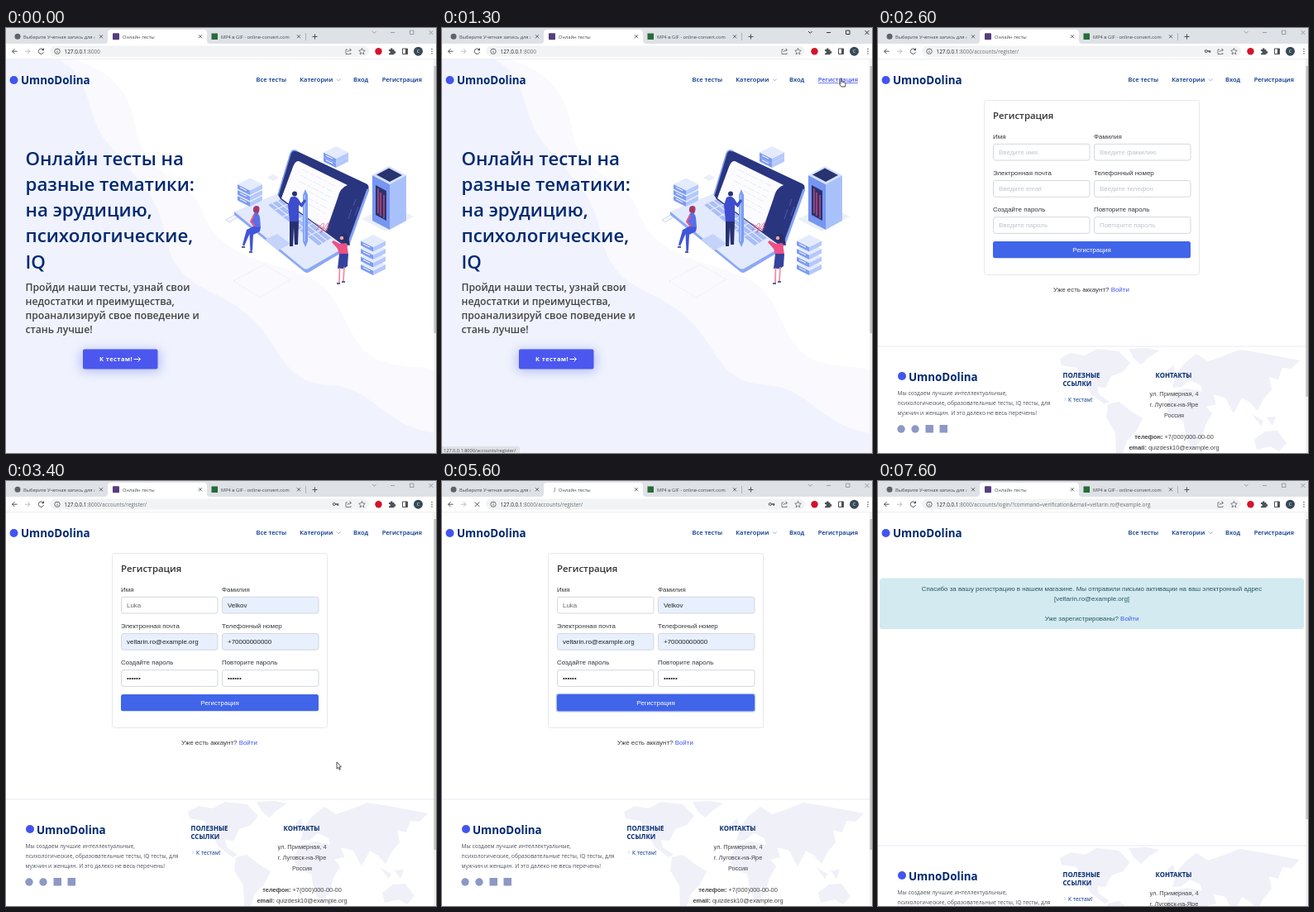
Animation of 520 by 514 pixels, one loop 8 s. Source, as an HTML page:

```html
<!DOCTYPE html>
<html lang="ru">
<head>
<meta charset="utf-8">
<style>
html, body { margin: 0; height: 100%; overflow: hidden; background: #fff; }
svg { display: block; width: 100vw; height: 100vh; }
text { white-space: pre; }
.ui { font-family: "Open Sans", sans-serif; font-size: 5.7px; fill: #45494e; }
.url { font-size: 6.4px; fill: #6a6e73; }
.url .host { fill: #222; }
.head { font-family: "Open Sans", sans-serif; font-weight: 600; fill: #012970; }
.bold { font-weight: 700; }
.nav { font-size: 7.5px; }
.brand { font-size: 13.4px; }
.small { font-family: "Open Sans", sans-serif; font-size: 6.75px; fill: #50545c; }
.body { font-family: "Liberation Sans", Arial, sans-serif; font-size: 7.95px; fill: #33373c; }
.contact { font-family: "Liberation Sans", Arial, sans-serif; font-size: 7.4px; fill: #444; }
.mid { text-anchor: middle; }
.line { fill: none; stroke: #4d5156; stroke-width: 1; }
.link { fill: #4154f1; }
</style>
</head>
<body>
<svg viewBox="0 0 520 514" preserveAspectRatio="none">
<defs>
  <clipPath id="tabClip1"><path d="M20 3h88v14H20z"/></clipPath>
  <clipPath id="tabClip2"><path d="M128 3h100v14H128z"/></clipPath>
  <filter id="glow" x="-30%" y="-100%" width="160%" height="300%"><feGaussianBlur stdDeviation="7"/></filter>
  <linearGradient id="fade"><stop offset=".75" stop-color="#dee1e6" stop-opacity="0"/><stop offset="1" stop-color="#dee1e6"/></linearGradient>

  <g id="slab">
    <path d="M-15 0 0 7.500V13L-15 5.500z" fill="#7d9bf2"/><path d="M15 0 0 7.500V13L15 5.500z" fill="#b4c8fb"/>
    <path d="M0-7.500 15 0 0 7.500-15 0z" fill="#e4ebfd"/><path d="M-12 3.700-4 7.700" stroke="#fff" stroke-width="1"/>
  </g>

  <g id="footer">
    <path d="M0 385H517" stroke="#e9eaf4"/>
    <g fill="#eff0f8">
      <path d="M220 400 233 393 250 396 265 388 291 391 305 405 296 416 282 421 275 435 265 434 267 443 280 452 274 455 258 443 246 424 240 411 222 408z"/>
      <path d="M303 388 325 387 340 390 328 398 318 407 309 399z"/>
      <path d="M278 455 291 452 308 465 320 472 312 488 301 499 296 514 288 514 287 489 276 471z"/>
      <path d="M361 418 371 405 385 394 399 403 417 397 437 389 462 393 489 398 510 402 500 412 489 411 484 425 473 422 476 437 466 449 459 463 450 453 440 447 430 466 420 447 405 443 409 455 397 458 404 466 396 480 391 498 379 510 372 491 369 475 353 470 347 457 357 440 374 436 392 440 390 432 377 426 367 434 356 435z"/>
      <path d="M350 414 357 408 360 419 352 424zM452 467 466 475 463 481zM470 471 481 470 477 481zM455 498 468 488 483 487 494 502 485 512 475 506 458 510z"/>
    </g>
    <circle cx="29" cy="421" r="5" fill="#4154f1"/>
    <text class="head bold brand" x="37" y="426.500">UmnoDolina</text>
    <g class="small">
      <text x="23.5" y="443.5">Мы создаем лучшие интеллектуальные,</text>
      <text x="23.5" y="455.7">психологические, образовательные тесты, IQ тесты, для</text>
      <text x="23.5" y="467.7">мужчин и женщин. И это далеко не весь перечень!</text>
      <text x="230" y="451.5" fill="#013289">К тестам!</text>
    </g>
    <path d="M225 447l2 2-2 2" class="line" style="stroke:#d0d4fc"/>
    <g fill="#8c98c5"><circle cx="28" cy="485" r="4.7"/><circle cx="45" cy="485" r="4.7"/><rect x="57.5" y="480" width="9.5" height="9.5"/><rect x="74.5" y="480" width="9.5" height="9.5"/></g>
    <g class="head bold" font-size="7.9">
      <text x="223.5" y="422.5">ПОЛЕЗНЫЕ</text><text x="223.5" y="432.7">ССЫЛКИ</text><text x="335.5" y="422.5">КОНТАКТЫ</text>
    </g>
    <g class="contact mid">
      <text x="358" y="444.7">ул. Примерная, 4</text>
      <text x="358" y="457.7">г. Луговск-на-Яре</text>
      <text x="358" y="470.7">Россия</text>
      <text x="358" y="496.7"><tspan class="bold">телефон:</tspan> +7(000)000-00-00</text>
      <text x="358" y="509.7"><tspan class="bold">email:</tspan> quizdesk10@example.org</text>
    </g>
  </g>
</defs>

<rect width="520" height="514" fill="#fff"/>

<g id="home">
  <path d="M0 38H82C138 56 150 85 157 122C167 184 219 174 237 221C258 281 325 282 367 302C417 326 407 388 455 403C485 413 508 407 520 416V514H0z" fill="#f9f9fe"/>
  <path d="M0 38H64C106 62 94 101 122 138C151 177 183 196 193 252C207 323 258 310 300 354C337 392 335 429 393 432C446 435 456 482 520 490V514H0z" fill="#f0f3fd"/>
  <g class="head" font-size="22.3" id="title"></g>
  <g class="head" font-size="12.2" style="fill:#444" id="subtitle"></g>
  <rect x="91" y="390" width="95" height="25" rx="3" fill="#4154f1" opacity=".36" filter="url(#glow)"/>
  <rect x="93" y="388.5" width="90.5" height="24" rx="2" fill="#4b57ee"/>
  <text class="head bold" x="113" y="403" font-size="7.5" letter-spacing=".4" style="fill:#fff">К тестам!</text>
  <path d="M154.500 400.500h8m-2.800-2.800 2.800 2.800-2.800 2.800" class="line" style="stroke:#fff"/>

  <g id="illustration">
    <path d="M275 306 312 286 344 304 307 326z" fill="none" stroke="#e3e6f0" stroke-width=".7" stroke-dasharray="2 1.500"/>
    <path d="M316 181l7-4 7 4-7 4zM430 231l35-17 28 14-34 18z" fill="#eceef8"/>
    <path d="M266 232 283 222 286 225 270 235z" fill="#f5f7ff" stroke="#b9c4e8" stroke-width=".7"/>
    <path d="M276 222V226L361 295Q364 297 367 295L412 268V264z" fill="#8ca8f5"/>
    <path d="M276 222 329 200 412 264 367 290Q363 293 359 290z" fill="#e3eafd"/>
    <path d="M317 214 333 207 393 254 378 263z" fill="#a9bdf7"/>
    <path d="M322 212 383 260M328 209 388 257M325 220 341 213M335 228 351 221M345 236 361 228M355 244 371 236M365 252 381 244" stroke="#e8eefe" stroke-width="1.100"/>
    <path d="M313 256 328 249 344 261 329 269z" fill="#c5d3fa"/>
    <path d="M329 202 344 152Q346 146 352 149L435 188Q440 190 438 196L415 259Q412 266 407 262L332 207z" fill="#2a3580"/>
    <path d="M329 202 344 152Q346 146 352 149" fill="none" stroke="#7f9cf2" stroke-width="1.600"/>
    <path d="M438 195 415 259Q412 266 407 262" fill="none" stroke="#86a4f5" stroke-width="3"/>
    <path d="M354 161 413 190Q404 193 401 206L387 246 333 206 347 168Q350 160 354 161z" fill="#fcfcff"/>
    <path d="M358 171 398 191M356 178 395 198M354 185 393 205M365 197 391 211M364 205 388 218M366 213 386 224" stroke="#e1e5f2" stroke-width=".8" stroke-dasharray="9 2 5 2"/>
    <path d="M423 207l-3 8m-2 4-4 12m12-15-4 11" stroke="#5263b0" stroke-width=".8"/>
    <path d="M375 245c7-10 12-12 8-3s-3 7 3-2 4-3 1 3 1 1 4-3M374 236l15 9" fill="none" stroke="#e64a72" stroke-width=".7"/>

    <use href="#slab" x="295" y="203"/><use href="#slab" x="295" y="196"/><use href="#slab" x="295" y="189"/>
    <use href="#slab" x="399" y="156"/><use href="#slab" x="399" y="150.500"/>
    <g id="stack"></g>

    <path d="M443 178 464 189V244L443 233z" fill="#7796f1"/><path d="M484 178 464 189V244L484 233z" fill="#a9c1fb"/>
    <path d="M443 178 463 167 484 178 464 189z" fill="#d4e1fe"/><path d="M448 177.500 463 169.500 479 178 464 186z" fill="#29336f"/>
    <path d="M447 190 460 197V233L447 226z" fill="#29336f"/><path d="M450 194V224M453 199V227M457 202V230" stroke="#e64b77" stroke-width="1.200"/>

    <path d="M359 202 362 195 365 202V258L362 265 359 258z" fill="#7b9df3"/><path d="M361 202V258" stroke="#c7d8fe"/>
    <circle cx="349" cy="200.500" r="3" fill="#2a3376"/>
    <path d="M344 205Q349 202 353 206L357 212 361 207 363 209 358 217 354 214V234H343L341 214z" fill="#3d4dcc"/>
    <path d="M343 234H354L353 262H349L348 241 347 264H343z" fill="#27306f"/>

    <path d="M299 222Q298 215 303 215T306 222L304 226z" fill="#a33a68"/>
    <path d="M300 224Q305 222 307 229L308 241 300 242 296 234z" fill="#5a6fe4"/>
    <path d="M300 226 296 234 301 240" fill="none" stroke="#ed5780" stroke-width="2"/>
    <path d="M299 240 308 241 307 246 299 250 298 269 295.500 271 294.500 249 288 264 286 262 291 244z" fill="#4056d9"/>
    <path d="M294 271h4M285 265h4" stroke="#27306f" stroke-width="1.500"/>

    <path d="M404 251Q410 245 414 252L416 263 408 261z" fill="#27306f"/><circle cx="406" cy="254" r="2.200" fill="#f2a49d"/>
    <path d="M404 261 412 260 414 274H403L401 267 394 259 396 257z" fill="#ed5185"/>
    <path d="M403 273H414L413 288 409 291H401z" fill="#34429f"/><path d="M403.500 290 403 308M409 289 408 306" stroke="#f08aa0" stroke-width="1.700"/>
    <path d="M400 309h4M406 307h4" stroke="#27306f" stroke-width="1.400"/>
  </g>
</g>

<g id="register">
  <rect x="128.500" y="87.500" width="260" height="211" rx="3" fill="#fff" stroke="#e6e8ee"/>
  <text class="head" x="139" y="109.700" font-size="11.4" style="fill:#333">Регистрация</text>
  <g id="fields"></g>
  <rect id="ring" x="137.800" y="256.800" width="241.400" height="22.600" rx="3.500" fill="#b3c0f3"/>
  <rect id="submit" x="139" y="258" width="239" height="20.300" rx="2.500"/>
  <text class="body mid" x="258.500" y="271" style="fill:#fff">Регистрация</text>
  <text class="body mid" x="258" y="319">Уже есть аккаунт? <tspan class="link">Войти</tspan></text>
  <use href="#footer"/>
</g>

<g id="done">
  <rect x="2" y="117.500" width="513" height="61.500" rx="3.500" fill="#d2eaf0"/>
  <g class="body mid" style="fill:#28575f">
    <text x="258.500" y="132.500">Спасибо за вашу регистрацию в нашем магазине. Мы отправили письмо активации на ваш электронный адрес</text>
    <text x="258.500" y="144.700">[veltarin.ro@example.org]</text>
    <text x="258.500" y="168.500">Уже зарегистрированы? <tspan class="link">Войти</tspan></text>
  </g>
  <use href="#footer" y="56"/>
</g>

<circle cx="9.500" cy="63" r="5" fill="#4154f1"/>
<text class="head bold brand" x="18" y="68">UmnoDolina</text>
<g class="head nav" style="fill:#013289">
  <text x="302.500" y="65.100">Все тесты</text><text x="355.300" y="65.100">Категории</text>
  <text x="420" y="65.100">Вход</text><text id="navRegister" x="454.700" y="65.100">Регистрация</text>
</g>
<path d="M400 61.500l2.300 2.300 2.300-2.300" class="line" style="stroke:#7886b5;stroke-width:.7"/>

<rect x="517" y="38" width="3" height="476" fill="#f1f1f1"/>
<rect id="thumb" x="517.500" y="46" width="2.500" fill="#c1c1c1"/>

<g id="chrome">
  <rect width="520" height="20" fill="#dee1e6"/>
  <path d="M119 19Q123 19 123 15V6Q123 2 127 2H239Q243 2 243 6V15Q243 19 247 19V38H520V19H0V38H119z" fill="#fff"/>
  <path d="M0 19H520V38H0z" fill="#fff"/><path d="M0 37.700H520" stroke="#e2e4e7" stroke-width=".7"/>
  <rect x="53" y="21.500" width="386" height="13" rx="6.500" fill="#f1f3f4"/>
  <circle cx="14" cy="10.300" r="3.500" fill="#5f6368"/>
  <text class="ui" x="21" y="12.500" clip-path="url(#tabClip1)">Выберите Учетная запись для использования</text>
  <rect x="88" y="5" width="21" height="11" fill="url(#fade)"/>
  <rect id="favicon" x="129" y="6.300" width="8" height="8" rx="1" fill="#563d7c"/>
  <path id="spinner" d="M0-3.700A3.700 3.700 0 0 1 3.700 0" class="line" style="stroke:#8a8f96"/>
  <text class="ui" id="tabTitle" x="141" y="12.500" clip-path="url(#tabClip2)"></text>
  <rect x="248.500" y="6.500" width="7.500" height="7.500" fill="#276b38"/>
  <text class="ui" x="260" y="12.500">MP4 в GIF - online-convert.com</text>
  <g id="tabClose" class="line" style="stroke-width:.9"></g>
  <path d="M362.500 6v9" stroke="#9aa0a6" stroke-width=".7"/><path d="M370.500 10.500h6m-3-3v6" class="line"/>
  <g id="controls" fill="none" stroke-width=".9">
    <path d="M443 4l2.300 2.300L447.600 4M465 5.500h5M488.500 3h4.500v4.500h-4.500zM511.500 3l5 5m0-5-5 5"/>
  </g>
  <path d="M13.500 28.200H7.500m3-3-3 3 3 3" class="line"/>
  <path d="M23 28.200h6m-3-3 3 3-3 3" class="line" style="stroke:#babdc1"/>
  <g id="reload"><path d="M45 26.200A3.200 3.200 0 1 0 45.500 29.200" class="line"/><path d="M46 24v3.200h-3.200z" fill="#4d5156"/></g>
  <path id="stop" d="M39.800 25.500l5.500 5.500m0-5.500-5.500 5.500" class="line"/>
  <circle cx="62" cy="28.200" r="3.200" class="line" style="stroke-width:.8"/><path d="M62 27.800v2.200M62 26v.8" class="line" style="stroke-width:.8"/>
  <text class="ui url" x="70.500" y="30.600"><tspan class="host">127.0.0.1</tspan><tspan id="path"></tspan></text>
  <g id="key"><circle cx="396.800" cy="28" r="1.500" class="line"/><path d="M398.300 28h4m-1 0v2" class="line" style="stroke-width:1.300"/></g>
  <path d="M413 26h-2v5.500h6V30M413 29q.5-2.500 4-2.500m-1.500-2 2 2-2 2" class="line" style="stroke-width:.7"/>
  <path d="M430.500 24.400l1.100 2.500 2.700.3-2 1.900.6 2.700-2.400-1.400-2.400 1.400.6-2.700-2-1.900 2.700-.3z" class="line" style="stroke-width:.7"/>
  <circle cx="450.500" cy="28.200" r="4.200" fill="#d4142c"/>
  <path d="M463 26h2a1.300 1.300 0 1 1 2.500 0h2v2.200a1.300 1.300 0 1 1 0 2.400v1.600h-6.500v-2a1.200 1.200 0 1 0 0-2z" fill="#4d5156"/>
  <path d="M479.500 25h6v6.500h-6z" class="line"/><path d="M483 25h3v6.500h-3z" fill="#4d5156"/>
  <circle cx="498.500" cy="28.200" r="5.500" fill="#364957"/><text class="ui mid" x="498.500" y="30.300" style="fill:#fff">С</text>
  <path d="M515 25.500v0m0 2.700v0m0 2.700v0" stroke="#4d5156" stroke-width="1.500" stroke-linecap="round"/>
</g>

<g id="status">
  <path d="M0 506H92Q94 506 94 508V514H0z" fill="#dee1e6"/>
  <text class="ui" x="2" y="512.800" style="font-size:5.6px">127.0.0.1:8000/accounts/register/</text>
</g>
<g id="cursor" fill="#fff" stroke="#222" stroke-width=".8">
  <path id="arrow" d="M0 0V8L1.800 6.300 3.100 9.300 4.400 8.700 3.100 5.800H5.400z"/>
  <path id="hand" d="M0 0q1-1 1.500 0V4l3.800 1q1 .4.800 1.500L5.500 10H1L-1.800 6.500q0-1 1.300-.5L0 6.500z"/>
</g>
</svg>
<script>
const $ = id => document.getElementById(id);
const show = (id, on) => $(id).style.display = on ? '' : 'none';
const lines = (id, x, y, step, rows) =>
  $(id).innerHTML = rows.map((row, i) => `<text x="${x}" y="${y + i * step}">${row}</text>`).join('');

lines('title', 23.5, 165.7, 31.2, ['Онлайн тесты на', 'разные тематики:', 'на эрудицию,', 'психологические,', 'IQ']);
lines('subtitle', 23.5, 318, 17, ['Пройди наши тесты, узнай свои', 'недостатки и преимущества,', 'проанализируй свое поведение и', 'стань лучше!']);
$('stack').innerHTML = [286, 276.5, 267, 257.5].map(y => `<use href="#slab" x="444" y="${y}"/>`).join('');
$('tabClose').innerHTML = [115, 235, 354].map(x => `<path d="M${x - 2} 8.300l4 4m0-4-4 4"/>`).join('');

// label, placeholder, value, autofilled
const fields = [
  ['Имя', 'Введите имя', 'Luka', false],
  ['Фамилия', 'Введите фамилию', 'Velkov', true],
  ['Электронная почта', 'Введите email', 'veltarin.ro@example.org', true],
  ['Телефонный номер', 'Введите телефон', '+70000000000', true],
  ['Создайте пароль', 'Введите пароль', '••••••', false],
  ['Повторите пароль', 'Повторите пароль', '••••••', false]
];
function drawFields(filled) {
  $('fields').innerHTML = fields.map(([label, hint, value, auto], i) => {
    const x = 139 + i % 2 * 122, y = 140 + (i >> 1) * 44.2;
    const ink = !filled ? '#bfc4cd' : i ? '#222' : '#666';
    return `<text class="body" x="${x}" y="${y - 6}">${label}</text>
      <rect x="${x + .5}" y="${y + .3}" width="116.500" height="19.700" rx="2.500" stroke="#d3d7de" fill="${filled && auto ? '#e8f0fe' : '#fff'}"/>
      <text class="body" x="${x + 7}" y="${y + 12.8}" style="fill:${ink}">${filled ? value : hint}</text>`;
  }).join('');
}

// time, x, y; each path is one visit of the pointer
const visits = [
  [[700, 400, 370], [800, 425, 270], [900, 465, 120], [1000, 482, 61], [1800, 482, 61], [1900, 460, 180]],
  [[3100, 510, 430], [3400, 400, 340], [3700, 318, 270], [4100, 318, 270], [4300, 317, 312], [4500, 335, 495]]
];
function pointerAt(t) {
  const visit = visits.find(v => t >= v[0][0] && t <= v.at(-1)[0]);
  if (!visit) return null;
  const i = Math.max(1, visit.findIndex(p => p[0] >= t));
  const [t0, x0, y0] = visit[i - 1], [t1, x1, y1] = visit[i];
  const k = (t - t0) / (t1 - t0);
  return [x0 + (x1 - x0) * k, y0 + (y1 - y0) * k];
}

let lastFilled;
function render(t) {
  const page = t < 1400 ? 'home' : t < 5700 ? 'register' : 'done';
  for (const id of ['home', 'register', 'done']) show(id, id === page);
  const opening = t >= 1400 && t < 1500;
  const sending = t >= 3900 && t < 5700;
  const active = t >= 1000 && t < 2600 || t >= 3900 && t < 4800;
  const filled = t >= 2800;
  if (filled !== lastFilled) drawFields(lastFilled = filled);

  show('favicon', !opening && !sending);
  show('spinner', sending);
  show('reload', !opening && !sending);
  show('stop', opening || sending);
  show('key', t >= 1900 && t < 5700);
  $('spinner').setAttribute('transform', `translate(133 10.300) rotate(${-t * .18 - 20})`);
  $('tabTitle').textContent = opening ? '127.0.0.1:8000/accounts/register/' : 'Онлайн тесты';
  $('path').textContent = ':8000' + {
    home: '', register: '/accounts/register/',
    done: '/accounts/login/?command=verification&email=veltarin.ro@example.org'
  }[page];
  $('controls').setAttribute('stroke', active ? '#222' : '#92959b');
  $('thumb').setAttribute('height', { home: 323, register: 400, done: 363 }[page]);

  const overLink = t >= 1000 && t < 1900;
  const overButton = t >= 3700 && t < 4200;
  $('navRegister').style.textDecoration = overLink ? 'underline' : 'none';
  $('navRegister').style.fill = overLink && page === 'home' ? '#4154f1' : '';
  $('status').style.opacity = t < 1000 || t >= 2300 ? 0 : t >= 2200 ? .5 : 1;
  show('ring', t >= 3900);
  $('submit').setAttribute('fill', t >= 3700 && t < 4400 ? '#2b50dd' : '#4065e9');

  const at = pointerAt(t);
  show('cursor', at);
  show('hand', overLink || overButton);
  show('arrow', !overLink && !overButton);
  if (at) $('cursor').setAttribute('transform', `translate(${at})`);
}

function tick() {
  render(Math.floor(performance.now() % 8000 / 100) * 100);
  requestAnimationFrame(tick);
}
tick();
</script>
</body>
</html>
```
